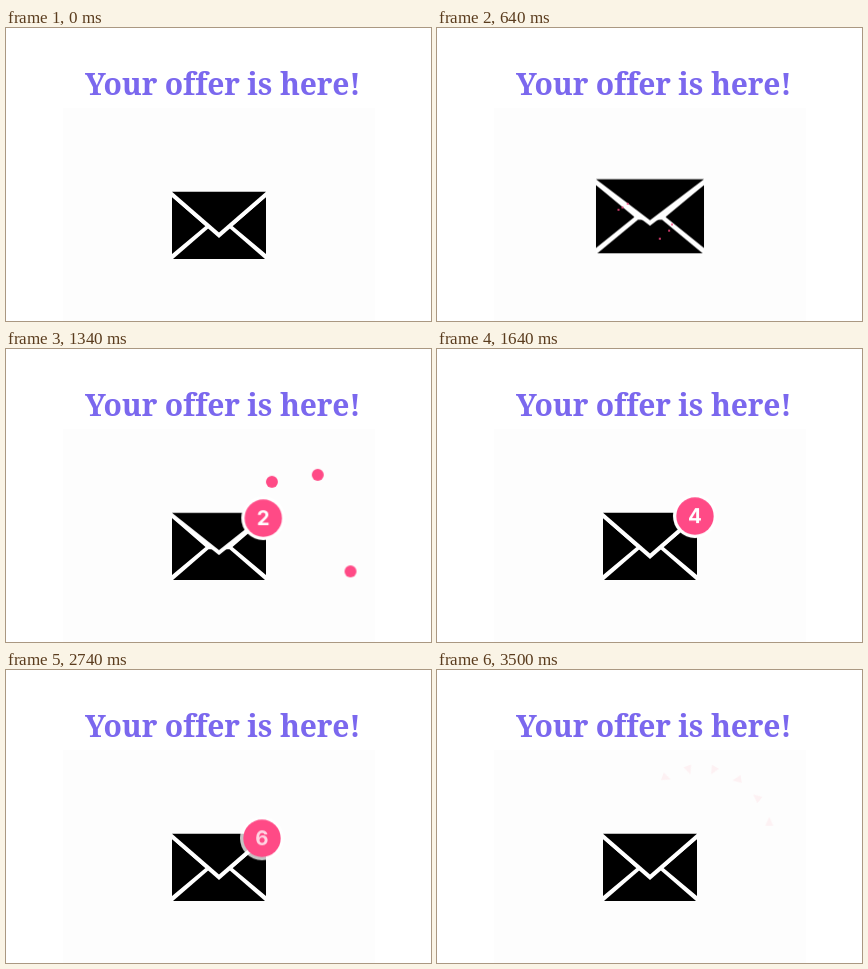
These frames come from a looping animation (425x293 px, 4180 ms). An HTML page:

```html
<!DOCTYPE html>
<html lang="en">
<head>
<meta charset="utf-8">
<title>Your offer is here!</title>
<style>
  html, body { margin: 0; width: 100%; height: 100%; overflow: hidden; background: #fff; }
  svg { display: block; width: 425px; height: 293px; }
  .title { font: 600 30px "Noto Serif", serif; letter-spacing: -.15px; fill: #7b68ee; }
  .digit { font: 700 20.5px Inter, sans-serif; fill: #fff; text-anchor: middle; }
  .pink { fill: #ff4a86; }
  .white { fill: #fff; }

  .mail, .flap, .badge, .disc, .fade { animation: 4180ms ease-in-out infinite; }
  .mail { transform-origin: 213px 197.5px; animation-name: mail; }
  .flap { transform-origin: 213px 164px; animation-name: flap; }
  .badge { animation-name: badge; }
  .disc { animation-name: disc; }
  .fade { animation-name: fade; animation-timing-function: linear; }

  @keyframes mail {
    0%, .6% { transform: none; }
    10% { transform: translateY(9.8px) scale(.71); }
    17.2% { transform: translateY(-12px) scale(1.22, 1.17); }
    26.8%, 100% { transform: none; }
  }
  @keyframes flap {
    0%, 13.4% { transform: none; }
    20% { transform: scaleY(.5); animation-timing-function: linear; }
    34.5%, 100% { transform: none; }
  }
  @keyframes badge {
    0%, 15.3% { transform: translate(235px, 180px) scale(0); }
    18.7% { transform: translate(263.5px, 150px) scale(1.2); }
    26.8% { transform: translate(257px, 170px); }
    41% { transform: translate(258px, 167px); }
    48% { transform: translate(259px, 170.7px); }
    56.5%, 100% { transform: translate(256px, 168.3px); }
  }
  @keyframes disc {
    0%, 65.5% { transform: none; opacity: 1; }
    68.5%, 100% { transform: scale(1.2); opacity: 0; }
  }
  @keyframes fade {
    0%, 65% { opacity: 1; }
    67.5%, 100% { opacity: 0; }
  }
</style>
</head>
<body>
<svg viewBox="0 0 425 293">
  <rect x="57" y="80" width="312" height="213" fill="#fdfdfd"/>
  <text class="title" x="79" y="67">Your offer is here!</text>

  <g class="mail">
    <path class="white" d="M166 164H260V231H166Z"/>
    <path d="M166 169L199.5 198L166 226ZM260 169L226.5 198L260 226Z"/>
    <path d="M167 231L202.5 200.3H223.5L259 231Z"/>
    <g class="flap">
      <path class="white" d="M166 164H260V169L213 210L166 169Z"/>
      <path d="M166 163.8H260L213 204.5Z"/>
    </g>
  </g>

  <g class="badge">
    <circle class="white fade" r="22"/>
    <circle class="pink disc" r="18.7"/>
    <g class="fade" id="digits"></g>
  </g>
  <g class="pink" id="dots"></g>
  <g fill="#ff4a66" id="confetti"></g>
</svg>
<script>
  const LOOP = 4180;
  const byId = id => document.getElementById(id);

  function add(parent, tag, attrs) {
    const el = document.createElementNS("http://www.w3.org/2000/svg", tag);
    for (const name in attrs) el.setAttribute(name, attrs[name]);
    return parent.appendChild(el);
  }

  // Keyframes are [time in ms, properties]
  function play(el, frames) {
    el.animate(frames.map(([ms, props]) => ({ offset: ms / LOOP, ...props })),
      { duration: LOOP, iterations: Infinity });
  }

  const polar = (cx, cy, angle, dist, size, turn = 0) => {
    const a = angle * Math.PI / 180;
    return `translate(${cx + dist * Math.cos(a)}px, ${cy + dist * Math.sin(a)}px) ` +
      `rotate(${turn}deg) scale(${size})`;
  };

  // Unread counter: one step every 180 ms
  const LAST = 6;
  const tick = n => 880 + 180 * n;
  for (let n = 0; n <= LAST; n++) {
    const digit = add(byId("digits"), "text", { class: "digit", y: 7.4 });
    digit.textContent = n;
    const hold = opacity => ({ opacity, easing: "step-end" });
    const from = n ? tick(n) : 0;
    const to = n < LAST ? tick(n + 1) : LOOP;
    play(digit, [[0, hold(0)], [from, hold(1)], [to, hold(0)], [LOOP, hold(0)]]);
  }

  // Three dots spread in a widening fan, grow, then shrink away
  function fan({ cx, cy, r, angle, spread, dist, step, start, mid, end }) {
    for (let i = 0; i < 3; i++) {
      const at = (reach, size) => ({
        transform: polar(cx, cy, angle + spread * i ** 1.5, (dist + step * i) * reach, size)
      });
      play(add(byId("dots"), "circle", { r }), [
        [0, at(0, 0)],
        [start, { ...at(0, 0), easing: "cubic-bezier(.2,.6,.5,1)" }],
        [mid, { ...at(1, 1), easing: "ease-out" }],
        [end, at(1.2, 0)],
        [LOOP, at(1.2, 0)]
      ]);
    }
  }
  const open = { cx: 213, cy: 190, r: 3, start: 600, mid: 900, end: 1080 };
  fan({ ...open, angle: 194.6, spread: 6.3, dist: 95, step: -9 });
  fan({ ...open, angle: 16.5, spread: 17, dist: 67, step: 0 });
  fan({ cx: 258, cy: 170, r: 6, angle: 282, spread: 38.6, dist: 38, step: 31.5,
    start: 1100, mid: 1340, end: 1620 });

  // Triangles thrown in an arc out of the popped badge
  for (let i = 0; i < 6; i++) {
    const at = (dist, size, turn) => polar(256, 168, 246 + 20.4 * i, dist, size, turn + 50 * i);
    const start = at(0, .3, -160);
    const end = at(66 + 2.4 * i, 1, 20);
    play(add(byId("confetti"), "path", { d: "M-4 -4L5 0L-4 4Z" }), [
      [0, { transform: start, opacity: 0 }],
      [2760, { transform: start, opacity: 0, easing: "step-end" }],
      [2780, { transform: start, opacity: 1, easing: "cubic-bezier(.1,.6,.4,1)" }],
      [3500, { transform: end, opacity: .07 }],
      [LOOP, { transform: end, opacity: .07 }]
    ]);
  }
</script>
</body>
</html>
```
